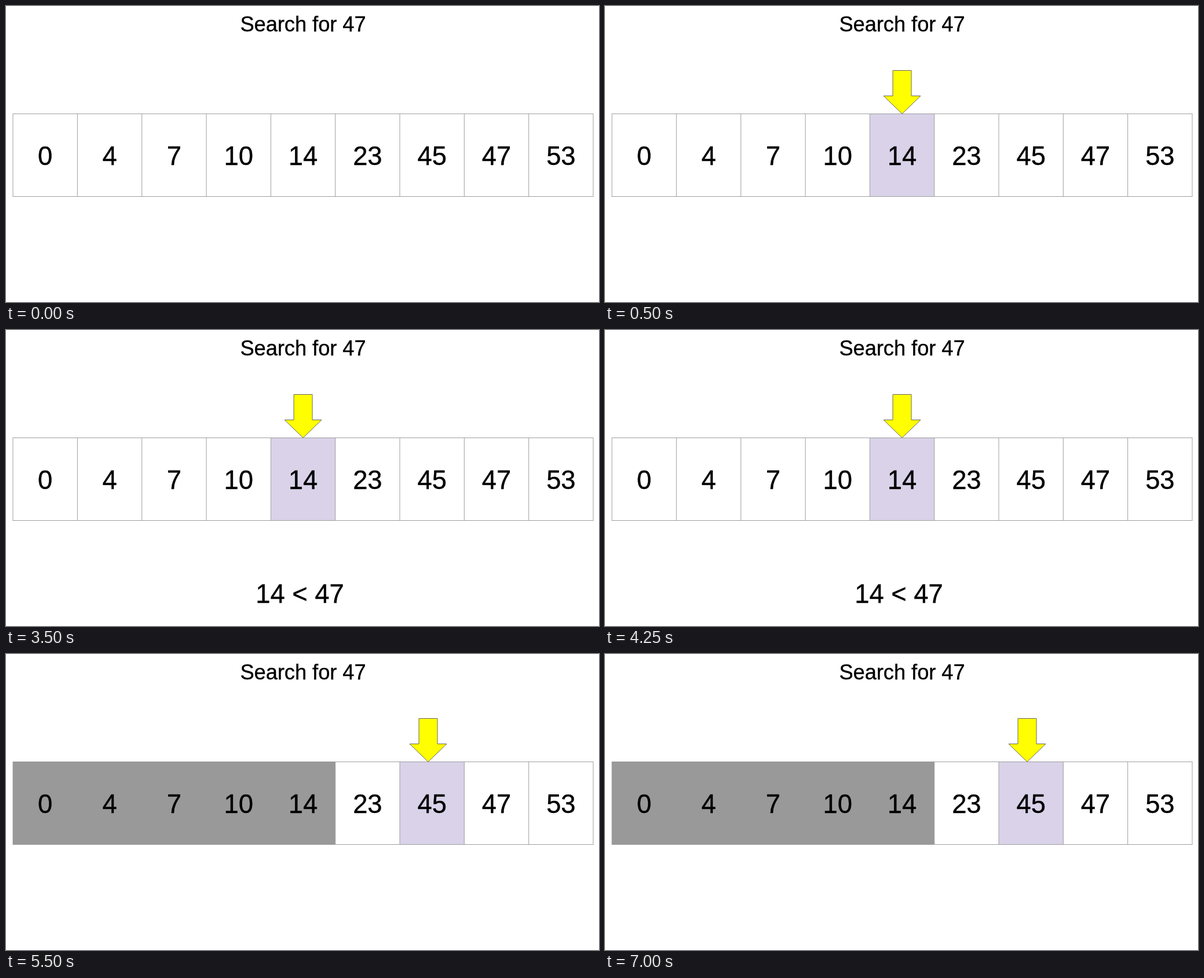
Write an HTML page with a canvas that moves like this. It is 1024 by 512 pixels and loops after 8000 ms.

```html
<!DOCTYPE html>
<html lang="en">
<head>
<meta charset="utf-8">
<title>Binary search</title>
<style>
  html, body { margin: 0; width: 100%; height: 100%; overflow: hidden; background: #fff; }
  canvas { display: block; }
</style>
</head>
<body>
<canvas id="stage" width="1024" height="512"></canvas>
<script>
const ctx = document.getElementById('stage').getContext('2d');
const LOOP = 8000;
const values = [0, 4, 7, 10, 14, 23, 45, 47, 53];
const LEFT = 12, CELL = 1002 / 9, TOP = 186.5, BOTTOM = 329.5;
const LINE = '#9e9e9e', PROBE = '#d9d2e9', DROPPED = '#999999';

const steps = [
  { at: 0 },
  { at: 500, probe: 4, arrowX: 513 },
  { at: 3500, probe: 4, arrowX: 513, note: '14 < 47' },
  { at: 5500, probe: 6, arrowX: 729, dropped: 5 }
];

const edge = i => LEFT + CELL * i;

function text(str, x, y, size) {
  ctx.font = `${size}px "Liberation Sans", Arial, sans-serif`;
  ctx.textAlign = 'center';
  ctx.fillStyle = ctx.strokeStyle = '#000';
  ctx.lineWidth = 0.4;
  ctx.fillText(str, x, y);
  ctx.strokeText(str, x, y);
}

function fillCells(from, to, color) {
  ctx.fillStyle = color;
  ctx.fillRect(edge(from), TOP, edge(to) - edge(from), BOTTOM - TOP);
}

function grid() {
  const right = edge(values.length);
  ctx.beginPath();
  for (let i = 0; i <= values.length; i++) {
    ctx.moveTo(edge(i), TOP);
    ctx.lineTo(edge(i), BOTTOM);
  }
  for (const y of [TOP, BOTTOM]) {
    ctx.moveTo(LEFT - 0.5, y);
    ctx.lineTo(right + 0.5, y);
  }
  ctx.strokeStyle = LINE;
  ctx.lineWidth = 1;
  ctx.stroke();
}

function arrow(x) {
  const half = [[16, 111.5], [16, 155.5], [32, 155.5], [0, 186.5]];
  ctx.beginPath();
  half.forEach(([dx, y]) => ctx.lineTo(x + dx, y));
  half.slice(0, 3).reverse().forEach(([dx, y]) => ctx.lineTo(x - dx, y));
  ctx.closePath();
  ctx.fillStyle = '#ffff00';
  ctx.fill();
  ctx.strokeStyle = '#666666';
  ctx.lineWidth = 1;
  ctx.lineJoin = 'round';
  ctx.stroke();
}

function draw(t) {
  const step = steps.filter(s => s.at <= t).pop();
  ctx.fillStyle = '#fff';
  ctx.fillRect(0, 0, 1024, 512);

  if (step.probe !== undefined) fillCells(step.probe, step.probe + 1, PROBE);
  grid();
  if (step.dropped) fillCells(0, step.dropped, DROPPED);

  text('Search for 47', 513, 44, 36.2);
  values.forEach((v, i) => text(v, edge(i + 0.5), 275, 45.3));
  if (step.arrowX) arrow(step.arrowX);
  if (step.note) text(step.note, 507.5, 472, 45.3);
}

const start = performance.now();
function tick() {
  draw((performance.now() - start) % LOOP);
  requestAnimationFrame(tick);
}
tick();
</script>
</body>
</html>
```
